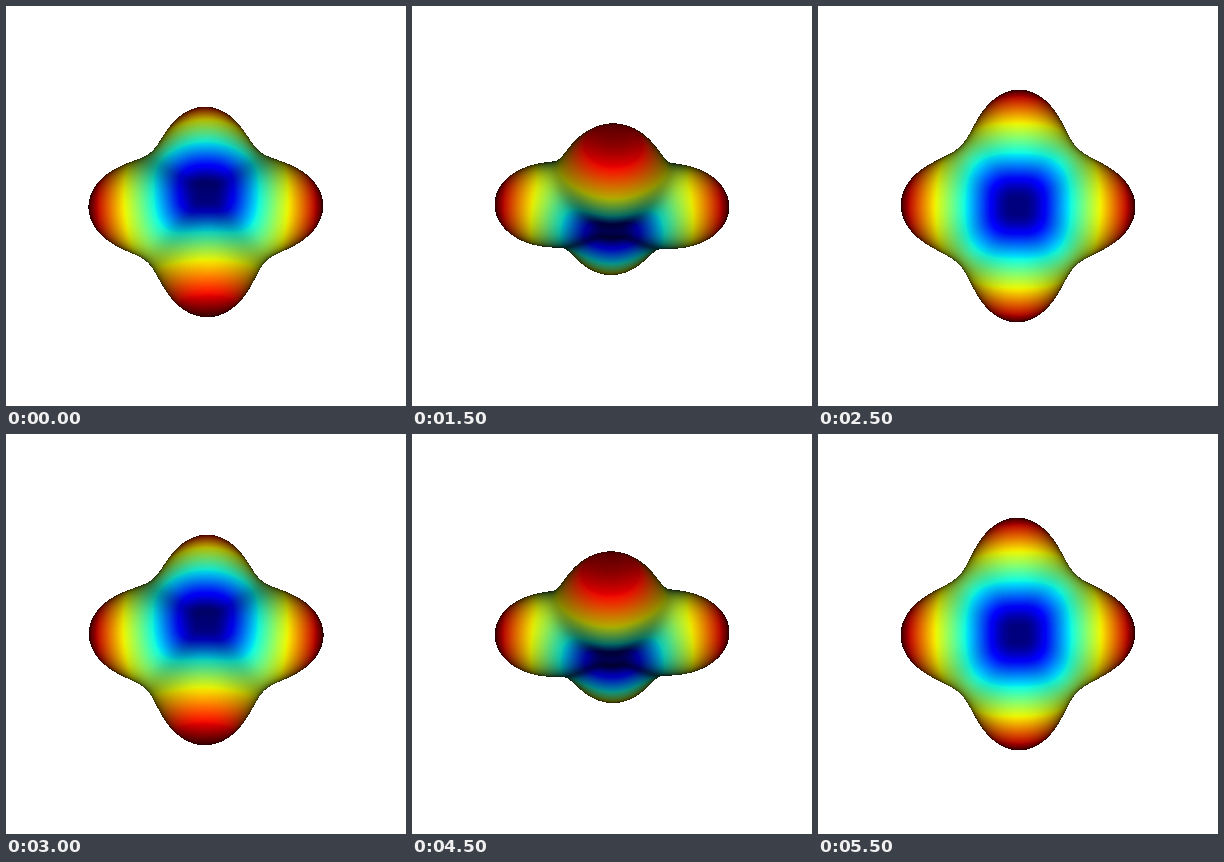
Recreate the animation shown at these times as a matplotlib script. Size 400 by 400 pixels, loop 6 s.

```python
import numpy as np
import matplotlib.pyplot as plt
from matplotlib.animation import FuncAnimation

SIZE = 400
FRAMES = 12
CAMERA = SIZE / 2 / np.tan(np.radians(15))  # eye distance for a 30 degree view angle
POLE = 33.0                                 # radius along the flat axis
LOBE_X, LOBE_Y = 84.0, 83.0                 # extra radius at the lobe tips
WEB = 33.0                                  # fills the gaps between the lobes
ROLL, YAW = 0.013, -0.0075                  # slight misalignment with the spin axis
REACH = 124

ALIGN = np.array([[1, -ROLL, -YAW],
                  [ROLL, 1, 0],
                  [YAW, 0, 1]])


def rotation(angle):
    c, s = np.cos(angle), np.sin(angle)
    return np.array([[1, 0, 0], [0, c, s], [0, -s, c]]) @ ALIGN


def quartic(x2, y2):
    return LOBE_X * x2 * x2 + LOBE_Y * y2 * y2 + WEB * x2 * y2


def level(p):
    """Negative inside the surface r = POLE + quartic(x^2, y^2) / r^4."""
    x2, y2, z2 = p * p
    r2 = x2 + y2 + z2 + 1e-9
    return np.sqrt(r2) - POLE - quartic(x2, y2) / (r2 * r2)


def normal(p):
    x, y, _ = p
    r = np.sqrt((p * p).sum(axis=0))
    slope = np.array([4 * LOBE_X * x**3 + 2 * WEB * x * y**2,
                      4 * LOBE_Y * y**3 + 2 * WEB * x**2 * y,
                      0 * x])
    n = p / r + 4 * quartic(x * x, y * y) * p / r**6 - slope / r**4
    return n / np.sqrt((n * n).sum(axis=0))


def render(angle):
    turn = rotation(angle)
    axis = np.arange(-REACH, REACH) + 0.5
    u, v = (g.ravel() for g in np.meshgrid(axis, -axis))

    def at(depth, u, v):
        scale = 1 - depth / CAMERA
        return turn.T @ np.array([u * scale, v * scale, depth + 0 * u])

    # March towards the back, keeping the first depth inside the surface.
    step = 2.5
    hit = np.full(u.size, np.nan)
    active = np.arange(u.size)
    for depth in np.arange(REACH, -REACH, -step):
        inside = level(at(depth, u[active], v[active])) < 0
        hit[active[inside]] = depth
        active = active[~inside]

    found = np.flatnonzero(~np.isnan(hit))
    uf, vf = u[found], v[found]
    low, high = hit[found], hit[found] + step
    for _ in range(10):
        mid = (low + high) / 2
        inside = level(at(mid, uf, vf)) < 0
        low, high = np.where(inside, mid, low), np.where(inside, high, mid)

    p = at(low, uf, vf)
    radius = np.sqrt((p * p).sum(axis=0))
    shade = np.clip((turn @ normal(p))[2], 0, 1)
    color = plt.cm.jet((radius - POLE) / LOBE_X)[:, :3] * shade[:, None]

    patch = np.ones((u.size, 3))
    patch[found] = color
    image = np.ones((SIZE, SIZE, 3))
    a, b = SIZE // 2 - REACH, SIZE // 2 + REACH
    image[a:b, a:b] = patch.reshape(2 * REACH, 2 * REACH, 3)
    return image


fig = plt.figure(figsize=(4, 4), dpi=100, facecolor="white")
ax = fig.add_axes([0, 0, 1, 1])
ax.axis("off")
picture = ax.imshow(np.ones((SIZE, SIZE, 3)), interpolation="nearest", aspect="auto")
cache = {}


def update(i):
    if i not in cache:
        cache[i] = render(2 * np.pi * (i + 1) / FRAMES)
    picture.set_data(cache[i])
    return [picture]


anim = FuncAnimation(fig, update, frames=FRAMES, interval=500, repeat=True, repeat_delay=0)
plt.show()
```
